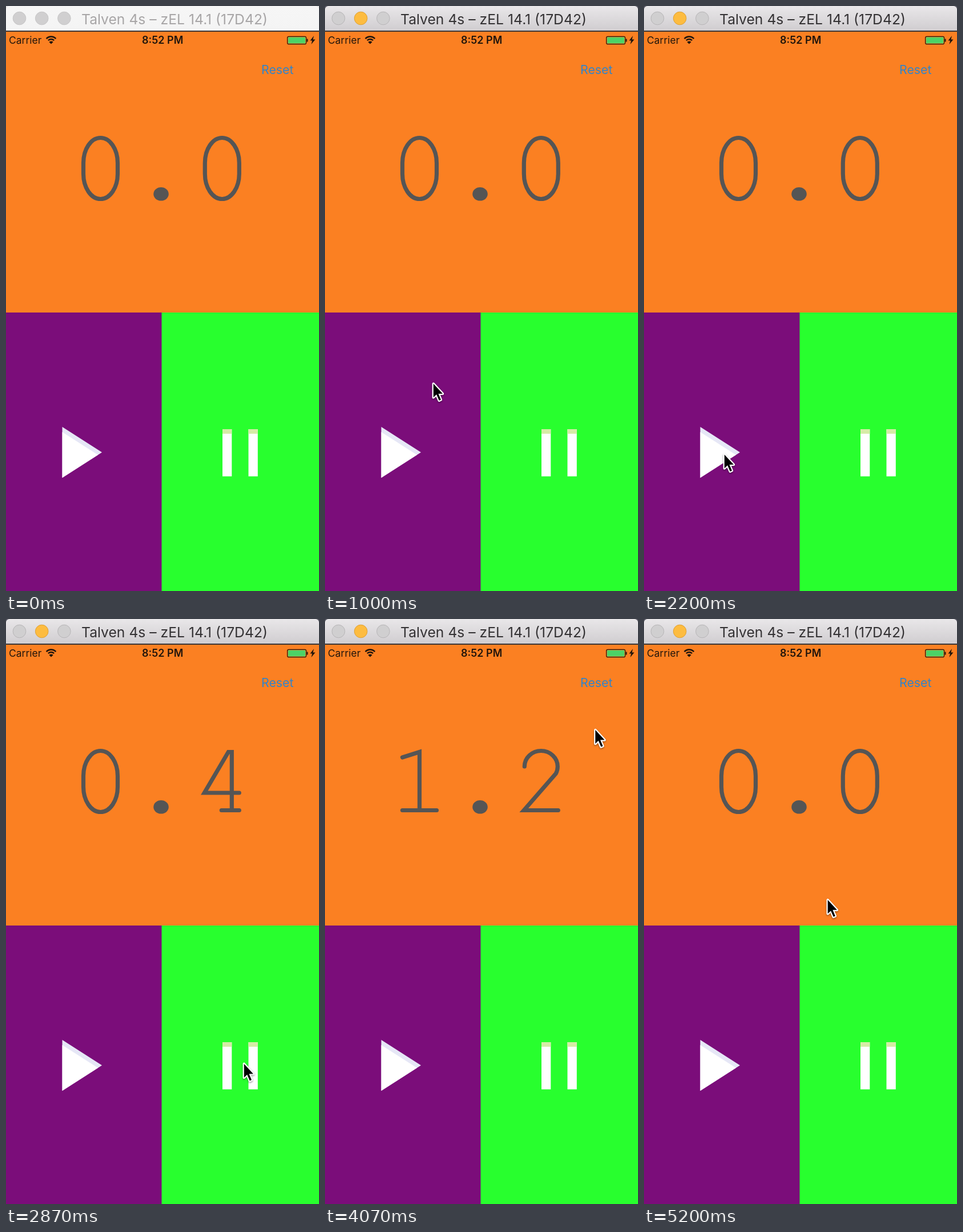
An HTML page with a canvas that plays this animation: 548 px wide and 1023 px high, repeating every 5270 ms.

```html
<!DOCTYPE html>
<html lang="en">
<head>
<meta charset="utf-8">
<title>Stopwatch</title>
<style>
  html, body { margin: 0; width: 100%; height: 100%; overflow: hidden; background: #fff; }
  canvas { display: block; }
</style>
</head>
<body>
<canvas id="stage" width="548" height="1023"></canvas>
<script>
const ctx = document.getElementById('stage').getContext('2d');
const LOOP = 5270;
const STEP = 200 / 3;
const PI = Math.PI;
const INK = '#21150c';

// Moments of the interaction, in ms.
const ACTIVATE = 330;
const PLAY_DOWN = 2260, PLAY_UP = 2390, TIMER_START = 2430;
const PAUSE_DOWN = 3520, PAUSE_UP = 3720, TIMER_STOP = 3700;
const RESET_DOWN = 4590, RESET_UP = 4720, RESET_FADED = 5000;

// The pointer glides to each goal and rests there until the next glide.
const ENTRY = { x: 548, y: 560 };
const GLIDES = [
  { from: 560, to: 1000, x: 188, y: 657 },
  { from: 1070, to: 1730, x: 139, y: 781 },
  { from: 2450, to: 3130, x: 432, y: 774 },
  { from: 3800, to: 4330, x: 477, y: 109 },
  { from: 4870, to: 6370, x: 178, y: 830 }
];

const clamp = k => Math.min(1, Math.max(0, k));
const between = (t, from, to) => t >= from && t < to;
const easeOut = k => 1 - (1 - k) ** 3;
const mix = (a, b, k) => a + (b - a) * k;

function rect(x, y, w, h, color) {
  ctx.fillStyle = color;
  ctx.fillRect(x, y, w, h);
}

function line(...points) {
  points.forEach(([x, y], i) => i ? ctx.lineTo(x, y) : ctx.moveTo(x, y));
}

function polygon(color, ...points) {
  ctx.fillStyle = color;
  ctx.beginPath();
  line(...points);
  ctx.fill();
}

// Elliptical arc with angles in half turns.
function arc(x, y, rx, ry, from = 0, to = 2) {
  ctx.ellipse(x, y, rx, ry, 0, from * PI, to * PI);
}

function separateArc(x, y, rx, ry, from = 0, to = 2) {
  ctx.moveTo(x + rx * Math.cos(from * PI), y + ry * Math.sin(from * PI));
  arc(x, y, rx, ry, from, to);
}

function text(value, x, y, font, color) {
  ctx.font = `${font} Inter, sans-serif`;
  ctx.fillStyle = color;
  ctx.fillText(value, x, y);
}

function drawTitleBar(active) {
  rect(0, 0, 548, 45, active ? '#50505c' : '#e4e4e4');
  const shade = ctx.createLinearGradient(0, 0, 0, 43);
  shade.addColorStop(0, active ? '#e9e7e9' : '#f6f6f6');
  shade.addColorStop(1, active ? '#d0cdd0' : '#f4f4f4');
  ctx.fillStyle = shade;
  ctx.beginPath();
  ctx.roundRect(0, 0, 548, 43, [6, 6, 0, 0]);
  ctx.fill();
  rect(0, 43, 548, 2, '#3c3636');

  for (let i = 0; i < 3; i++) {
    const lit = active && i === 1;
    ctx.beginPath();
    arc(23.5 + 39.2 * i, 21.5, 11.3, 11.3);
    ctx.fillStyle = lit ? '#fdbc40' : '#d0cfd0';
    ctx.strokeStyle = lit ? '#dea034' : active ? '#b7b5b7' : '#c6c5c6';
    ctx.lineWidth = 1;
    ctx.fill();
    ctx.stroke();
  }
  text('Talven 4s – zEL 14.1 (17D42)', 132, 31.5, '24.7px', active ? '#343234' : '#a8a6a7');
}

function drawStatusBar() {
  text('Carrier', 5, 66, '17.5px', INK);
  text('8:52 PM', 238, 66, '600 18px', INK);

  ctx.strokeStyle = ctx.fillStyle = INK;
  ctx.lineWidth = 2.4;
  for (const r of [7, 11.5]) {
    ctx.beginPath();
    arc(79, 65, r, r, -0.76, -0.24);
    ctx.stroke();
  }
  ctx.beginPath();
  ctx.moveTo(79, 66.5);
  arc(79, 66.5, 5, 5, -0.76, -0.24);
  ctx.fill();

  ctx.lineWidth = 1.2;
  ctx.beginPath();
  ctx.roundRect(492.6, 53.3, 33, 13.4, 2.5);
  ctx.stroke();
  rect(494, 54.7, 30.2, 10.6, '#4cd267');
  rect(526.5, 57.5, 2, 5, INK);
  polygon(INK, [539, 52], [532.5, 60.5], [536, 60.5], [534.5, 67], [541.5, 58.5], [537.5, 58.5]);
}

// Strokes of each digit around its centre: W and H are half sizes,
// T and B the heights of the flat top and the foot.
const W = 30, H = 53.5, T = -51.5, B = 50.5;
const DIGITS = [
  () => ctx.roundRect(-W, -H, 2 * W, 2 * H, { x: W, y: 44 }),
  () => { line([-W, -42], [0, T], [0, B]); line([-W, B], [W, B]); },
  () => { arc(0, -26, 29, 27.5, 1, 2.15); ctx.lineTo(-W, B); ctx.lineTo(W, B); },
  () => { arc(-3, -28.5, W, 25, -0.8, 0.5); separateArc(-1, 25, W, 28.5, -0.5, 0.8); },
  () => { line([17, B], [17, T], [11, T], [-31, 20], [W, 20]); line([-1, B], [W, B]); },
  () => { line([24, T], [-22, T], [-22, -3]); arc(0, 20, W, 33, -0.75, 0.8); },
  () => { arc(0, 22, 28.5, 31.5); separateArc(27, 22, 55.5, 74, 1, 1.5); },
  () => line([-W, -44], [-W, T], [W, T], [0, B]),
  () => { arc(0, -28.5, 26, 25); separateArc(0, 25, 29, 28.5); },
  () => { ctx.rotate(PI); DIGITS[6](); }
];

function drawDigit(n, x) {
  ctx.save();
  ctx.translate(x, 284);
  ctx.beginPath();
  DIGITS[n]();
  ctx.stroke();
  ctx.restore();
}

function drawTimer(tenths) {
  ctx.strokeStyle = ctx.fillStyle = '#555555';
  ctx.lineWidth = 7.2;
  ctx.lineCap = 'round';
  drawDigit(Math.floor(tenths / 10) % 10, 165.5);
  drawDigit(tenths % 10, 378.3);
  ctx.lineCap = 'butt';
  ctx.beginPath();
  arc(271.5, 328.8, 13.3, 11.8);
  ctx.fill();
}

function drawPlay(pressed) {
  const left = 98.5, right = 168;
  polygon(pressed ? '#858088' : '#e6e7f6', [left, 736], [right, 780.5], [left, 825]);
  polygon(pressed ? '#8c868c' : '#ffffff', [left, 745], [161, 785], [left, 825]);
}

function drawPause(pressed) {
  for (const x of [379, 424.5]) {
    rect(x, 740, 16.3, 82.5, pressed ? '#8c868c' : '#ffffff');
    rect(x, 740, 16.3, 8, pressed ? '#78743f' : '#d5eca6');
  }
}

function pointerAt(t) {
  let { x, y } = ENTRY;
  for (const glide of GLIDES) {
    const k = easeOut(clamp((t - glide.from) / (glide.to - glide.from)));
    x = mix(x, glide.x, k);
    y = mix(y, glide.y, k);
  }
  return [x, y];
}

function drawPointer(t) {
  if (t < GLIDES[0].from) return;
  ctx.save();
  ctx.translate(...pointerAt(t));
  ctx.beginPath();
  line([1.8, 3.5], [1.8, 27.5], [7.2, 22.3], [11.8, 33], [15, 31.6], [10.5, 21], [18, 21]);
  ctx.closePath();
  ctx.lineJoin = 'round';
  ctx.lineWidth = 4.4;
  ctx.strokeStyle = '#fff';
  ctx.shadowColor = 'rgba(0,0,0,.4)';
  ctx.shadowBlur = 3;
  ctx.shadowOffsetY = 1.5;
  ctx.stroke();
  ctx.shadowColor = 'transparent';
  ctx.fillStyle = '#000';
  ctx.fill();
  ctx.restore();
}

function timerAt(t) {
  if (!between(t, TIMER_START, RESET_UP)) return 0;
  return Math.floor((Math.min(t, TIMER_STOP) - TIMER_START) / 100);
}

function resetAlpha(t) {
  if (!between(t, RESET_DOWN, RESET_FADED)) return 1;
  const k = clamp((t - RESET_UP) / (RESET_FADED - RESET_UP));
  return mix(0.27, 1, k * k * (3 - 2 * k));
}

function draw(t) {
  drawTitleBar(t >= ACTIVATE);
  rect(0, 45, 548, 491, '#fb8022');
  rect(0, 536, 548, 487, '#28ff2e');
  rect(0, 536, 272.5, 487, '#7b0d7a');
  drawStatusBar();

  ctx.globalAlpha = resetAlpha(t);
  text('Reset', 447, 119, '21.3px', '#3484c8');
  ctx.globalAlpha = 1;

  drawTimer(timerAt(t));
  drawPlay(between(t, PLAY_DOWN, PLAY_UP));
  drawPause(between(t, PAUSE_DOWN, PAUSE_UP));
  drawPointer(t);
}

const start = performance.now();
function tick() {
  const t = (performance.now() - start) % LOOP;
  // Motion advances at 15 pictures per second.
  draw(Math.floor((t + 4) / STEP) * STEP);
  requestAnimationFrame(tick);
}
tick();
</script>
</body>
</html>
```
